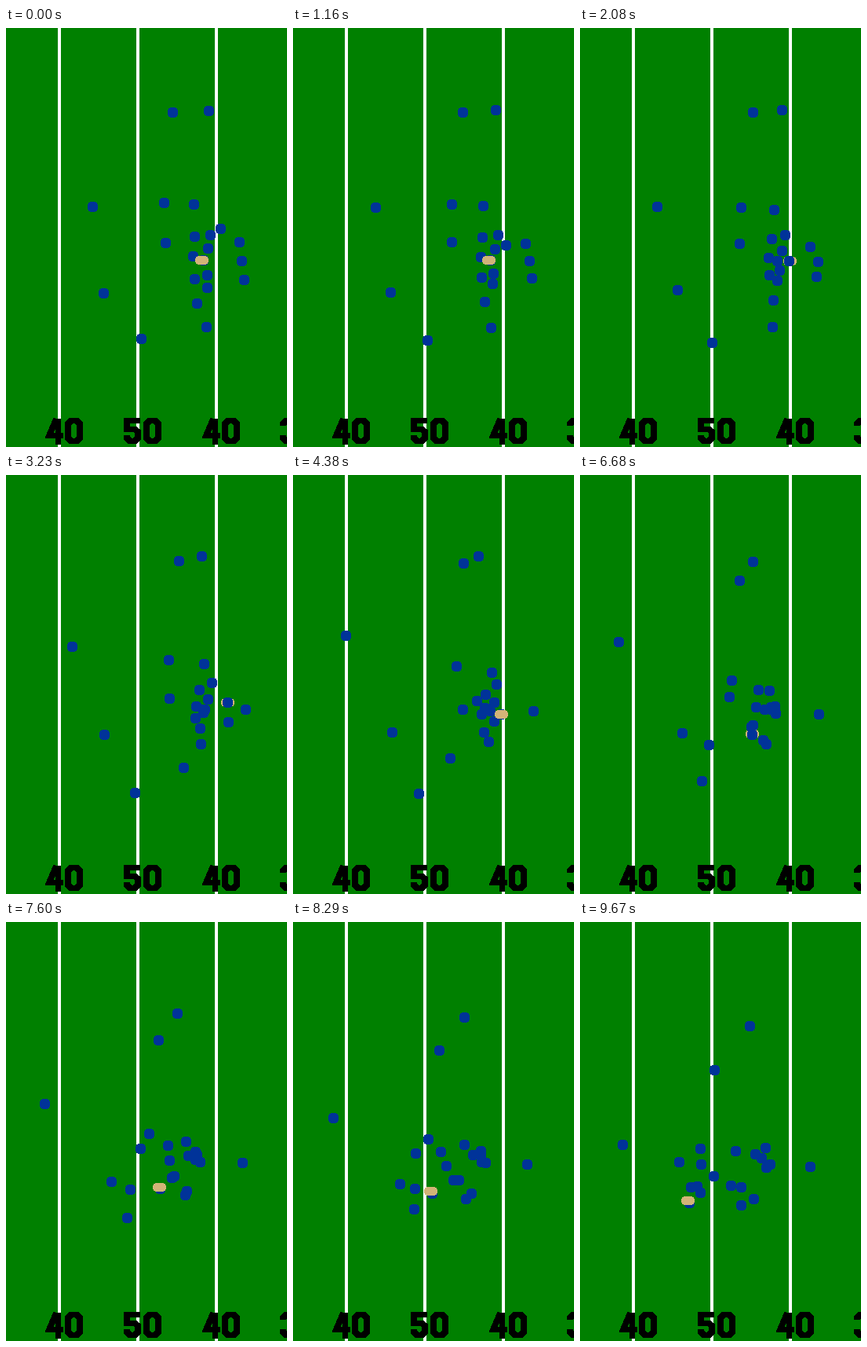
Animation, 358 px wide and 533 px high, one loop 9.9 s. Source, as a matplotlib script:

```python
import numpy as np
import matplotlib.pyplot as plt
from matplotlib.animation import FuncAnimation
from matplotlib.collections import EllipseCollection

W, H, DPI = 358, 533, 64
STEPS, LOOP_MS = 43, 9900
GREEN, BLUE, TAN = "#008000", "#003399", "#d2b478"
SNAP, HANDOFF, CONTACT, LAST = 6, 13, 25, STEPS - 1
SNAP_SPOT, HANDOFF_SPOT = np.array([249, 295]), np.array([292, 298])

# A route is lineup, contact and finish; fast starters add a release point.
DEFENSE = [
    [(212, 107), (220, 107), (210, 122), (171, 188)],
    [(110, 227), (98, 227), (52, 200), (54, 283)],
    [(203, 273), (203, 274), (221, 314), (192, 335)],
    [(201, 222), (202, 254), (153, 288)],
    [(239, 224), (243, 264), (154, 308)],
    [(240, 265), (236, 288), (170, 323)],
    [(238, 290), (244, 296), (236, 287)],
    [(240, 319), (238, 299), (223, 295)],
    [(243, 350), (244, 339), (205, 360)],
    [(124, 337), (128, 326), (141, 337)],
    [(172, 395), (156, 399), (153, 344)],
]
LINE = [
    [(260, 263), (251, 270), (198, 291)],
    [(257, 280), (252, 292), (231, 300)],
    [(251, 295), (250, 302), (242, 308)],
    [(256, 314), (245, 296), (237, 312)],
    [(256, 330), (251, 321), (237, 333), (221, 352)],
]
SKILL = [
    [(258, 105), (257, 104), (224, 105), (216, 132)],
    [(255, 380), (245, 380), (173, 347), (149, 336)],
    [(273, 255), (266, 296), (208, 279), (126, 305)],
    [(303, 320), (301, 316), (229, 314), (205, 337)],
    [(300, 296), (306, 302), (293, 311)],
]
RUNNER = [(297, 272), (293, 278), (240, 321), (139, 357)]

# Centre lines of the block numerals in a 21 by 32 cell.
GLYPHS = {
    "0": [[(3, 14), (3, 7), (7, 3), (14, 3), (18, 7), (18, 25),
           (14, 29), (7, 29), (3, 25), (3, 14)]],
    "3": [[(2, 9), (2, 7), (6, 3), (13, 3), (17, 7), (17, 12), (13, 15), (7, 15)],
          [(13, 15), (17, 19), (17, 25), (13, 29), (6, 29), (2, 25), (2, 22)]],
    "4": [[(15, 0), (15, 32)], [(13, 1), (4, 22), (22, 22)]],
    "5": [[(20, 3), (3, 3), (3, 14), (13, 14), (17, 17), (17, 25),
           (13, 29), (7, 29), (3, 25), (3, 22)]],
}


def run(route):
    """Smooth path along a route, from a standing start."""
    knots = [0, 9, CONTACT, LAST] if len(route) == 4 else [0, CONTACT, LAST]
    t, p = np.array(knots, float), np.array(route, float)
    slope = np.gradient(p, t, axis=0)
    slope[0] = 0
    k = np.arange(STEPS)
    i = np.clip(np.searchsorted(t, k, "right") - 1, 0, len(t) - 2)
    span = (t[i + 1] - t[i])[:, None]
    u = (k - t[i])[:, None] / span
    return ((1 + 2 * u) * (1 - u) ** 2 * p[i] + u * (1 - u) ** 2 * span * slope[i]
            + u * u * (3 - 2 * u) * p[i + 1] + u * u * (u - 1) * span * slope[i + 1])


def carry(runner):
    """Ball rests, flies to the handoff, then stays with the runner."""
    k = np.arange(STEPS)[:, None]
    flight = np.clip((k - SNAP) / (HANDOFF - SNAP), 0, 1)
    tossed = SNAP_SPOT + flight * (HANDOFF_SPOT - SNAP_SPOT)
    lift = np.maximum(0, k - 22) * np.array([0.08, 0.16])
    return np.where(k < HANDOFF, tossed, runner - lift)


def to_pixels(path):
    return np.round(path) + 0.5


def ellipses(ax, size, color, offsets, z):
    n = len(offsets)
    c = EllipseCollection([size[0]] * n, [size[1]] * n, [0] * n, units="xy",
                          offsets=offsets, offset_transform=ax.transData,
                          facecolors=color, edgecolors="none", linewidths=0,
                          antialiased=False, snap=False, zorder=z)
    ax.add_collection(c, autolim=False)
    return c


def number(ax, text, x, y=496.5):
    for n, char in enumerate(text):
        for stroke in GLYPHS[char]:
            sx, sy = np.array(stroke).T
            ax.plot(sx + x + 25 * n, sy + y, color="black", lw=6.5 * 72 / DPI,
                    solid_capstyle="butt", solid_joinstyle="miter",
                    antialiased=False, zorder=2)


runner = run(RUNNER)
paths = [run(route) for route in DEFENSE + LINE + SKILL] + [runner]
players = to_pixels(np.stack(paths, axis=1))
ball = to_pixels(carry(runner))

fig = plt.figure(figsize=(W / DPI, H / DPI), dpi=DPI, facecolor=GREEN)
ax = fig.add_axes([0, 0, 1, 1])
ax.axis("off")
for n, text in enumerate(["40", "50", "40", "3"]):
    x = 66 + 100 * n
    ax.axvspan(x, x + 4, color="white", lw=0, antialiased=False, zorder=1)
    number(ax, text, x - 15)
ax.set_xlim(0, W)
ax.set_ylim(H, 0)

dots = ellipses(ax, (13, 13), BLUE, players[0], 4)
football = ellipses(ax, (17, 11), TAN, ball[:1], 5)


def draw(k):
    dots.set_offsets(players[k])
    football.set_offsets(ball[k:k + 1])
    covered = 8 <= k < 17 or 22 <= k < 33
    football.set_zorder(3 if covered else 5)
    return dots, football


anim = FuncAnimation(fig, draw, frames=STEPS, interval=LOOP_MS / STEPS,
                     repeat=True, repeat_delay=0, blit=False)
plt.show()
```
